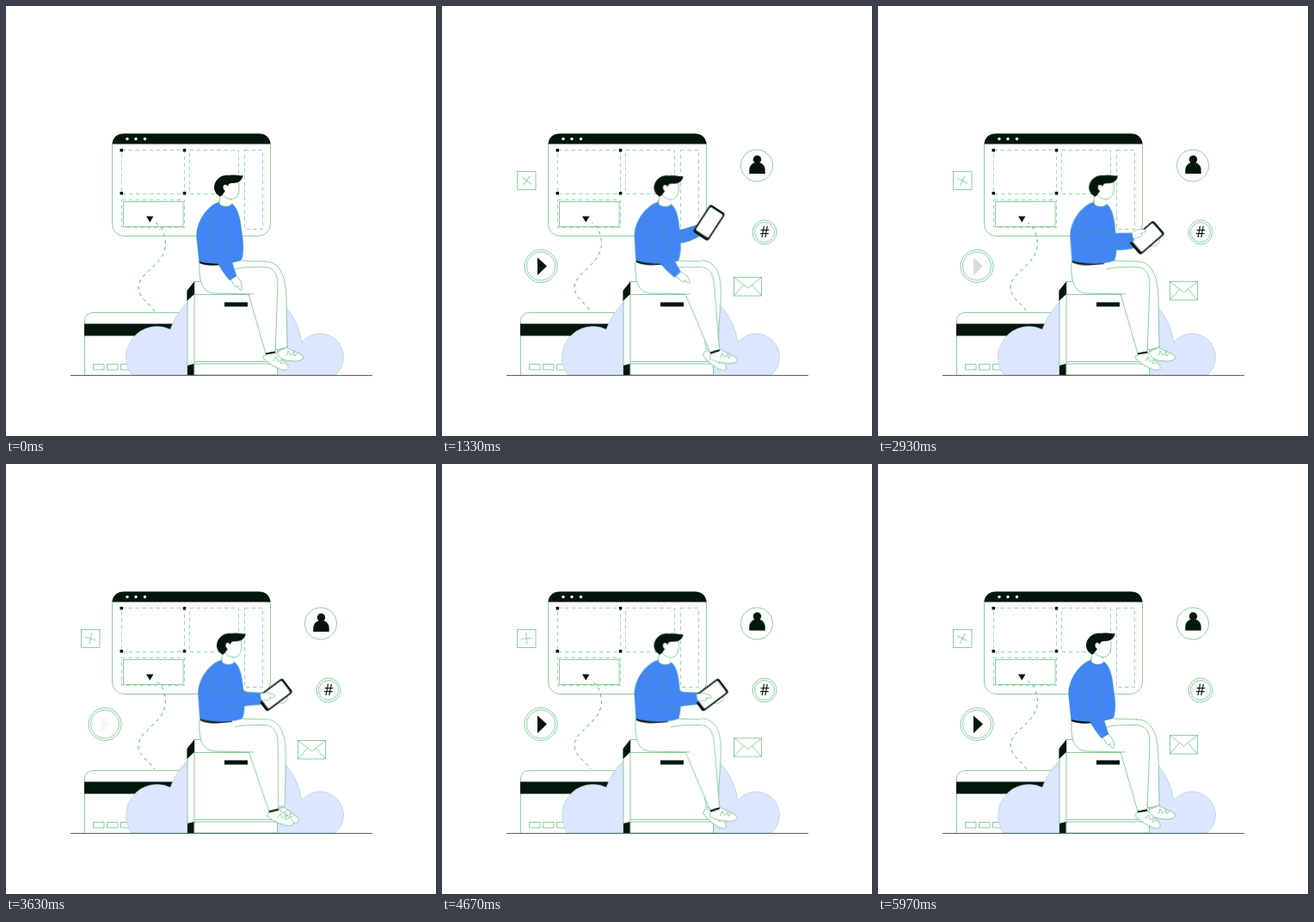
Write an HTML page that moves like this. It is 500 px wide and 500 px high and loops after 6000 ms.

```html
<!DOCTYPE html>
<html lang="en">
<head>
<meta charset="utf-8">
<title>Man with a tablet</title>
<style>
html, body { margin: 0; width: 100%; height: 100%; overflow: hidden; background: #fff; }
svg { display: block; width: 100vw; height: 100vh; }

.line { fill: none; stroke: #3fae62; stroke-width: .6; }
.paper { fill: #fff; stroke: #3fae62; stroke-width: .6; }
.white { fill: #fff; }
.ink { fill: #02160a; }
.blue { fill: #4285f4; }
.soft { opacity: .6; }
.dash { stroke-dasharray: 4.5 3.5; }
.sock { stroke: #02160a; stroke-width: 2; }

.move { animation: 6s cubic-bezier(.37, 0, .63, 1) infinite; }
.swing { animation: 1.5s cubic-bezier(.37, 0, .63, 1) infinite alternate; }
.center { transform-box: fill-box; transform-origin: center; }

/* legs */
.near-shin { animation-name: nearShin; transform-origin: 299px 320px; }
.far-shin { animation-name: farShin; transform-origin: 316px 318px; }
.near-foot { animation-name: nearFoot; }
.far-foot { animation-name: farFoot; }
@keyframes nearShin { to { transform: rotate(-7deg); } }
@keyframes farShin { to { transform: rotate(5deg); } }
@keyframes nearFoot {
  from { transform: translate(308px, 403px) rotate(22deg); }
  to { transform: translate(308px, 403px) rotate(7deg); }
}
@keyframes farFoot {
  from { transform: translate(320px, 399px) rotate(0deg); }
  to { transform: translate(320px, 401px) rotate(26deg); }
}

/* upper body */
.torso { animation-name: torso; transform-origin: 250px 297px; }
.head { animation-name: head; transform-origin: 255px 228px; }
.far-arm { animation-name: farArm; transform-origin: 258px 252px; }
.forearm { animation-name: forearm; transform-origin: 247px 272px; }
.hand { animation-name: hand; transform-origin: 264px 316px; }
.grip { animation-name: grip; }
@keyframes torso {
  0%, 4%, 97%, 100% { transform: translate(0, 0) rotate(0deg); }
  22%, 78%, 83% { transform: translate(1px, 0) rotate(2.3deg); }
  34.5% { transform: translate(.5px, 0) rotate(1deg); }
  49% { transform: translate(1px, 0) rotate(1.8deg); }
  60.5% { transform: translate(1px, 0) rotate(1.5deg); }
}
@keyframes head {
  0%, 22%, 78%, 100% { transform: rotate(0deg); }
  34.5% { transform: rotate(-6deg); }
  49% { transform: rotate(-1.5deg); }
}
@keyframes farArm {
  0%, 4%, 97%, 100% { transform: rotate(85deg); }
  20%, 22.5% { transform: rotate(0deg); }
  34.5% { transform: translate(5px, -1px) rotate(17deg); }
  49% { transform: translate(4px, 3px) rotate(16deg); }
  60.5%, 82% { transform: translate(5px, -1.5px) rotate(20deg); }
}
@keyframes forearm {
  0%, 10%, 98%, 100% { transform: rotate(0deg); }
  22% { transform: rotate(-13deg); }
  33%, 49% { transform: rotate(-75deg); }
  60.5%, 82% { transform: rotate(-71deg); }
}
@keyframes hand {
  0%, 10%, 98%, 100% { transform: rotate(0deg); }
  22% { transform: rotate(-10deg); }
  34.5%, 69% { transform: rotate(-4deg); }
  49% { transform: rotate(-8deg); }
  60.5%, 78%, 83% { transform: rotate(9deg); }
}
@keyframes grip {
  0%, 23%, 90%, 100% { transform: translateY(-9px); }
  34%, 82% { transform: translateY(0); }
}

/* icons */
.pop-a { animation-name: popA; }
.pop-b { animation-name: popB; }
.pop-c { animation-name: popC; }
@keyframes popA { 0%, 3% { transform: scale(0); } 11%, 100% { transform: scale(1); } }
@keyframes popB { 0%, 7% { transform: scale(0); } 15%, 100% { transform: scale(1); } }
@keyframes popC { 0%, 11.5% { transform: scale(0); } 19.5%, 100% { transform: scale(1); } }

.cross { animation-name: cross; }
.play { animation-name: play; }
.mail { animation-name: mail; }
.user { animation-name: user; }
.flow { animation: flow 6s linear infinite; stroke-dasharray: 4 4; stroke-width: .9; }
@keyframes cross {
  0%, 22% { transform: rotate(38deg); }
  34.5% { transform: rotate(12deg); }
  49% { transform: rotate(27deg); }
  60.5% { transform: rotate(15deg); }
  78% { transform: rotate(-5deg); }
  100% { transform: rotate(28deg); }
}
@keyframes play {
  0%, 28% { opacity: 1; }
  55%, 61% { opacity: .03; }
  77%, 100% { opacity: 1; }
}
@keyframes mail { 0%, 22%, 99% { transform: none; } 60% { transform: translateY(6px); } }
@keyframes user {
  0%, 22%, 49%, 60.5% { transform: none; }
  34.5%, 78%, 100% { transform: translateY(-1.4px); }
}
@keyframes flow { to { stroke-dashoffset: -96; } }
</style>
</head>
<body>
<svg viewBox="0 0 500 500">
  <defs>
    <g id="foot">
      <path class="paper" d="M-6 4L6-2C12 2 20 3 25 8C27 12 22 14 16 14C8 14 0 12-6 9Z"/>
      <path class="line" d="M6 8l2-6 3 5 4-4 0 5 4-3"/>
    </g>
  </defs>

  <!-- browser window -->
  <rect class="paper" x="123.5" y="148.5" width="184" height="119" rx="14"/>
  <path class="ink" d="M123.5 160.5C124 153 129 148.5 137 148.5H294C302 148.5 307 153 307.5 160.5Z"/>
  <g class="white">
    <circle cx="141" cy="154.5" r="1.7"/>
    <circle cx="151" cy="154.5" r="1.7"/>
    <circle cx="161.5" cy="154.5" r="1.7"/>
  </g>
  <g class="line dash" opacity=".85">
    <rect x="134.5" y="167.5" width="73" height="51"/>
    <rect x="213.5" y="167.5" width="57" height="51"/>
    <rect x="277.5" y="167.5" width="21" height="92"/>
    <rect x="134.5" y="225.5" width="73" height="32"/>
  </g>
  <path class="ink" d="M132.5 166h3.5v3.5h-3.5zM205.8 166h3.5v3.5h-3.5zM132.5 216h3.5v3.5h-3.5zM205.8 216h3.5v3.5h-3.5z"/>
  <rect class="paper" x="136.5" y="227.5" width="69.5" height="29"/>
  <path class="ink" d="M163 244.5H171.5L167.3 251.5Z"/>
  <path class="line flow" d="M174 252C182 256 187 270 185 281C181 303 154 310 154 328C155 340 167 346 173 355"/>

  <!-- bank card -->
  <path class="paper" d="M91.5 429V367Q91.5 356.5 102 356.5H230V429"/>
  <rect class="ink" x="91" y="369.5" width="130" height="14"/>
  <path class="line" d="M101.5 416.5h12.5v6.5h-12.5zM117.5 416.5h12.5v6.5h-12.5zM133.5 416.5h12.5v6.5h-12.5z"/>

  <!-- cloud -->
  <path fill="#dce6ff" stroke="#8fc5c0" stroke-width=".5" d="M146 429A36 36 0 0 1 191 376A79 79 0 0 1 344 391A27.3 27.3 0 1 1 384 428V429Z"/>

  <!-- box -->
  <path class="paper" d="M211 429V331L219 320.5H315.5V429Z"/>
  <path class="line" d="M219 320.5V429M219 335.5H315.5M219 413.5H315.5M219 416H315.5"/>
  <path class="ink" d="M210.5 331L219 320.5V335L210.5 343ZM211 418L218.5 416V429H211Z"/>
  <rect class="ink" x="254" y="344.5" width="27" height="5"/>
  <path d="M75 429.5H426" stroke="#55655b"/>

  <!-- icons -->
  <g class="move center pop-a">
    <circle class="paper" cx="366" cy="185.5" r="18.5"/>
    <g class="move user ink">
      <circle cx="366.5" cy="178.5" r="4.7"/>
      <path d="M357.3 195V191C357.3 178.5 375.7 178.5 375.7 191V195Z"/>
    </g>
  </g>
  <g class="move center pop-b">
    <circle class="paper" cx="375" cy="263" r="14"/>
    <circle class="line" cx="375" cy="263" r="11.5"/>
    <text class="ink" x="375.2" y="269.3" text-anchor="middle" font-family="'Open Sans', sans-serif" font-size="17.5">#</text>
  </g>
  <g class="move center pop-b">
    <g class="move mail">
      <rect class="paper" x="339.5" y="315.5" width="32" height="21.5"/>
      <path class="line" d="M339.5 315.5L355.5 328L371.5 315.5M339.5 337L350.5 324.5M371.5 337L360.5 324.5"/>
    </g>
  </g>
  <g class="move center pop-b">
    <circle class="paper" cx="115" cy="302.5" r="19"/>
    <circle class="line" cx="115" cy="302.5" r="16.5"/>
    <path class="ink move play" d="M111 292.5L122 302.5L111 313Z"/>
  </g>
  <g class="move center pop-c">
    <rect class="paper" x="87.5" y="192.5" width="21.5" height="21"/>
    <path class="line move center cross" d="M91.5 203H105M98.25 196.25V209.75"/>
  </g>

  <!-- far arm with tablet -->
  <g class="move far-arm">
    <path class="blue" stroke="#3fae62" stroke-width=".4" d="M256 246C264 254 272 260 279 260L298 254L301 267C292 272 282 276 274 276C262 274 252 262 250 252Z"/>
    <g transform="translate(310.5 252) rotate(-57)">
      <path class="paper move grip" d="M-3 9C-2 14 6 15 10 12L12 8Z"/>
      <rect class="ink" x="-19" y="-10.5" width="38" height="21" rx="3"/>
      <rect class="white" x="-15.5" y="-8.8" width="32" height="17.5" rx="1.5"/>
    </g>
  </g>

  <!-- far leg -->
  <path class="white" d="M262 296L302 297L316 318L300 330L262 320Z"/>
  <g class="swing far-shin">
    <path class="paper" d="M300 297C318 297 325 312 326 340L327 397L314 400L300 330"/>
    <g class="swing far-foot"><use href="#foot"/></g>
  </g>
  <path class="line" d="M268 296L301 297"/>

  <!-- near leg -->
  <g class="swing near-shin">
    <path class="paper" d="M298 303.5C312 303 316 312 316 325L313 402L302 404L282 335"/>
    <g class="swing near-foot"><use href="#foot"/></g>
    <path class="sock" d="M302 404.5L313 402.5"/>
  </g>
  <path class="white" d="M225 297C224 318 227 333 242 334L288 335L302 324L298 303.5L270 305V297Z"/>
  <path class="line" d="M225 297C224 318 227 333 242 334L288 335M266 306C276 303 288 304 298 303.5"/>

  <!-- upper body -->
  <g class="move torso">
    <g class="move head">
      <path class="paper" d="M249 217L247.5 231C250 235 260 235 261.5 231L261 222Z"/>
      <path class="paper" d="M250 205L270 202C272 211 271.5 220 266 223.5C259 226.5 251 222 250 214Z"/>
      <path class="ink" d="M249.5 221.5C240 218 240 206 247 200.5C252 195.5 259 197 264 196.5C268 196.5 272 197.5 275.5 197C275 203 270 206 264 206C260 206 258.5 206.5 258 210C256 207 252.5 207 252.5 211C252.5 213 254 214.5 255 215C253 217 252 220 249.5 221.5Z"/>
    </g>
    <path class="ink" d="M224.5 296L225 299C234 303 246 302 262 299.5L262 296Z"/>
    <path class="blue" d="M247.5 228C235 232 221.5 249 221.5 268L224.5 297C238 301 262 301 274 295C277 285 276 275 274 262C272 242 268 233 262 229.5Z"/>
    <path class="paper" d="M248 228C247 234 261 235 262.5 229.5L261 225H248.5Z" stroke-dasharray="16 20"/>
    <path class="line soft" d="M247.5 228C235 232 221.5 249 221.5 268L224.5 297M262 229.5C268 233 272 242 274 262C276 275 277 285 274 295"/>
    <path class="blue" d="M236 246C240 237 250 237 253 246L257 269L238 276Z"/>
    <path class="line soft" d="M238 276L235.5 250C237 243 241 240 245 239.5M252 246L256 268"/>
    <g class="move forearm">
      <g class="move hand">
        <path class="paper" d="M261 317L267 313C270 316 273 319 274 324C275 328 274.5 331 272.5 330.5C271 329 270 327 269 325C269 328 267 328 265 324Z"/>
      </g>
      <path class="blue" d="M238 274C238 262 255 261 256 268C258 285 264 300 268 314L260 319C250 308 240 290 238 274Z"/>
      <path class="line soft" d="M256 268C258 285 264 300 268 314L260 319C250 308 240 290 238 274"/>
    </g>
  </g>
</svg>
</body>
</html>
```
